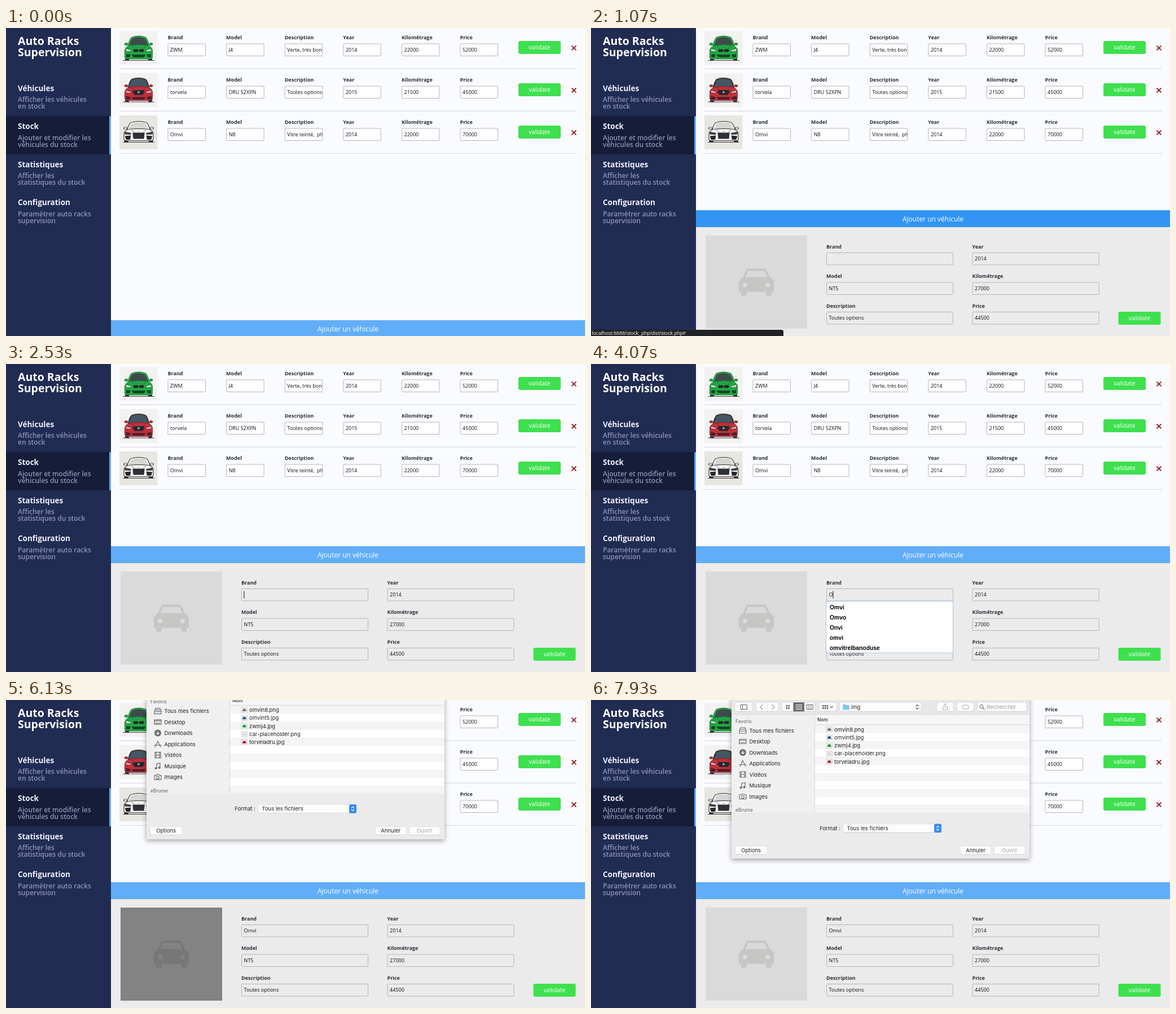
Write an HTML page that moves like this. It is 1026 px wide and 546 px high and loops after 8 s.

```html
<!DOCTYPE html>
<html lang="fr">
<head>
<meta charset="utf-8">
<title>Auto Racks Supervision</title>
<style>
  html, body { margin: 0; width: 100%; height: 100%; overflow: hidden; background: #fafbff; }
  svg { display: block; }
  text { font: 9px "Open Sans", sans-serif; fill: #0e0f13; white-space: pre; }
  .title { font-size: 19.5px; font-weight: 700; fill: #fff; }
  .head { font-size: 13.5px; font-weight: 700; fill: #eff1f8; }
  .sub { font-size: 12px; font-weight: 600; fill: #8b93b4; }
  .label { font-weight: 700; fill: #2c2f38; }
  .btn { font-size: 10.5px; font-weight: 500; fill: #fff; text-anchor: middle; }
  .bar { font-size: 12px; font-weight: 500; fill: #fff; text-anchor: middle; }
  .hint { font: 700 10.3px "Liberation Sans", Arial, sans-serif; fill: #000; }
  .link { font: 9.15px "Liberation Sans", Arial, sans-serif; fill: #e4e5e7; }
  .mac { font: 9.5px Inter, sans-serif; fill: #222; }
  .small { font: 500 8.3px Inter, sans-serif; fill: #757575; }
  .mid { text-anchor: middle; }
</style>
</head>
<body>
<svg id="stage" width="1026" height="546" viewBox="0 0 1026 546"></svg>
<script>
const LOOP = 8000;

const rect = (x, y, w, h, fill, more = '') =>
  `<rect x="${x}" y="${y}" width="${w}" height="${h}" fill="${fill}" ${more}/>`;
const text = (x, y, str, cls = '', more = '') =>
  `<text x="${x}" y="${y}" class="${cls}" ${more}>${str}</text>`;
const path = (d, fill, more = '') => `<path d="${d}" fill="${fill}" ${more}/>`;
const line = (d, color, width = 1) =>
  path(d, 'none', `stroke="${color}" stroke-width="${width}" stroke-linecap="round"`);
const dot = (x, y, r, fill) => `<circle cx="${x}" cy="${y}" r="${r}" fill="${fill}"/>`;
const group = (id, body) => `<g id="${id}">${body}</g>`;

const field = (x, y, w, value, fill, id = '') =>
  rect(x + .5, y + .5, w - 1, 21.5, fill, 'stroke="#b4b5b8" rx="1"') +
  `<svg x="${x}" y="${y}" width="${w}" height="22">` +
  text(4.6, 14, value, '', id && `id="${id}"`) + '</svg>';
const button = (x, y) =>
  rect(x, y, 75, 23, '#3ee04e', 'rx="3"') + text(x + 37.5, y + 15.2, 'validate', 'btn');

function sidebar() {
  const items = [
    ['Véhicules', 'Afficher les véhicules', 'en stock'],
    ['Stock', 'Ajouter et modifier les', 'véhicules du stock'],
    ['Statistiques', 'Afficher les', 'statistiques du stock'],
    ['Configuration', 'Paramétrer auto racks', 'supervision']
  ];
  return rect(0, 0, 186, 546, '#212c53') +
    rect(0, 156.5, 186, 67.5, '#151d39') + rect(183, 156.5, 3, 67.5, '#5eacf8') +
    text(21, 30, 'Auto Racks', 'title') + text(21, 49.5, 'Supervision', 'title') +
    items.map(([head, a, b], i) => {
      const y = 111.5 + i * 67.5;
      return text(21, y, head, 'head') + text(21, y + 19.7, a, 'sub') + text(21, y + 31.7, b, 'sub');
    }).join('');
}

// Front view of a car inside a 67 x 60 thumbnail
function car(y, c) {
  const edge = `stroke="${c.edge}" stroke-width="${c.stroke}" stroke-linejoin="round"`;
  const pair = f => f(-1) + f(1);
  const dome = (top, low, y0, y1) =>
    `M${34 - low} ${y1} Q${36 - low} ${y0 + 5} ${34 - top} ${y0} Q34 ${y0 - 5} ${34 + top} ${y0}` +
    ` Q${32 + low} ${y0 + 5} ${34 + low} ${y1}Z`;
  return `<g transform="translate(201 ${y})">` + rect(0, 0, 67.5, 60, c.back) +
    `<g transform="translate(34 ${c.dy}) scale(${c.wide} ${c.tall}) translate(-34 0)">` +
    pair(s => rect(34 + s * 20.5 - 3.5, 42, 7, 11, '#2b2d33', 'rx="1.5"')) +
    pair(s => `<ellipse cx="${34 + s * 22}" cy="23.500" rx="3" ry="2" fill="${c.body}" ${edge}/>`) +
    path(dome(13, 19, 11.5, 27), c.roof, edge) + path(dome(11.5, 16.5, 13.5, 25), c.glass) +
    path('M17 26 Q34 23 51 26 Q57 28.500 58.5 34 V47 Q58 50 55 50 H13 Q10 50 9.500 47 V34 Q11 28.500 17 26Z', c.body, edge) +
    line('M22 27 L26 32 M46 27 L42 32', c.edge, .7) +
    pair(s => path(`M${34 + s * 22.5} 31.500 L${34 + s * 13} 34 L${34 + s * 13.5} 37 L${34 + s * 23} 36Z`, c.light, edge)) +
    c.grille + '</g>' + line(`M6.500 ${c.ground} H61.500`, '#3c3f45') + '</g>';
}

function cars() {
  const dark = '#25282e';
  const slats = [0, 1, 2, 3, 4, 5].map(i => line(`M${26 + i * 3.2} 35 V45`, '#666', .5)).join('');
  return car(5, {
    back: '#f2f2f1', body: '#21a943', roof: '#27ae49', glass: '#3f4a4c', edge: '#14682c', stroke: .8,
    light: '#cfe4d4', dy: 0, wide: 1, tall: 1, ground: 52.5,
    grille: rect(24.5, 32.5, 9, 5, dark, 'rx="2"') + rect(34.5, 32.5, 9, 5, dark, 'rx="2"') +
      dot(34, 29.5, 1.2, '#426b91') +
      path('M12 41 L20 42 L18 47 H12Z M56 41 L48 42 L50 47 H56Z M22 42 H46 L44 47 H24Z', '#17432a')
  }) + car(80, {
    back: '#f2f2f1', body: '#c42f38', roof: '#36424c', glass: '#465663', edge: '#6a222a', stroke: .8,
    light: '#d9b6b8', dy: -.5, wide: 1, tall: .98, ground: 51,
    grille: path('M25 31 H43 L45 35 L41 40 H27 L23 35Z', dark) + dot(34, 35, 2.2, '#8b9298') +
      path('M11 42 L20 44 L18 48 H12Z M57 42 L48 44 L50 48 H57Z M22 44 H46 L44 48 H24Z', '#3f2029')
  }) + car(155, {
    back: '#e8e6e1', body: '#f8f8f6', roof: '#f8f8f6', glass: '#d5d5d3', edge: '#2c2c2e', stroke: 1,
    light: '#44474b', dy: 3, wide: 1.06, tall: .835, ground: 47.5,
    grille: path('M24 33 H44 L43 46 H25Z', dark) + slats + dot(34, 30, 1.1, '#888') +
      path('M11 40 L21 39 L20 48 H13Z M57 40 L47 39 L48 48 H55Z', dark)
  });
}

function stock() {
  const names = ['Brand', 'Model', 'Description', 'Year', 'Kilométrage', 'Price'];
  const rows = [
    ['ZWM', 'J4', 'Verte, très bon état', '2014', '22000', '52000'],
    ['torvela', 'DRU 52XPN', 'Toutes options', '2015', '21500', '45000'],
    ['Omvi', 'N8', 'Vitre teinté,\u00a0 phares', '2014', '22000', '70000']
  ];
  return rows.map((row, r) => {
    const y = r * 75;
    return row.map((v, i) => {
      const x = 286.5 + i * 103.6;
      return text(x, y + 20, names[i], 'label') + field(x, y + 27.5, 67.5, v, '#fff');
    }).join('') + button(908, y + 23) +
      line(`M1003 ${y + 32} l6.800 6.800 m0 -6.800 l-6.800 6.800`, '#9a2c30', 2) +
      rect(201, y + 71.8, 810.5, 1, '#d3d5da');
  }).join('') + cars();
}

function panel() {
  const left = [['Brand', ''], ['Model', 'NT5'], ['Description', 'Toutes options']];
  const right = [['Year', '2014'], ['Kilométrage', '27000'], ['Price', '44500']];
  const column = (x, list, id) => list.map(([name, value], i) => {
    const y = 398 + i * 52.5;
    return text(x, y - 7.3, name, 'label') + field(x, y, 225, value, '#ebebeb', i ? '' : id);
  }).join('');
  const icon =
    path('M269 442 L274.500 430 Q276 426.500 280 426.500 H306 Q310 426.500 311.500 430 L317 442 Q324 445 324 452 V467.500 H262 V452 Q262 445 269 442Z' +
      'M273.500 441.500 H312.500 L308 431.500 Q307.500 430.500 306 430.500 H280 Q278.500 430.500 278 431.500Z', '#c6c6c5', 'fill-rule="evenodd"') +
    rect(266, 464, 9.5, 10.5, '#c6c6c5', 'rx="2"') + rect(310.5, 464, 9.5, 10.5, '#c6c6c5', 'rx="2"') +
    dot(273, 455.5, 4, '#dadada') + dot(313, 455.5, 4, '#dadada');
  const hints = ['Omvi', 'Omvo', 'Onvi', 'omvi', 'omvitrelbanoduse'];
  return rect(186, 353, 840, 193, '#ebebeb') +
    rect(186, 323, 840, 30, '#61aef8', 'id="bar"') +
    text(606, 342.7, 'Ajouter un véhicule', 'bar') +
    rect(203, 368, 180, 165, '#dadada') + icon +
    rect(203, 368, 180, 165, '#000', 'id="shade"') +
    column(417, left, 'brand') + column(675.5, right, '') + button(934.5, 503) +
    rect(421.5, 402.5, 1, 13, '#111', 'id="caret"') +
    group('hints', rect(416.5, 420.5, 225, 91.5, '#fff', 'stroke="#a9c4ea"') +
      hints.map((h, i) => text(423, 434.7 + i * 18, h, 'hint')).join(''));
}

function dialog() {
  const ink = '#606060';
  const box = (x, y, w, h = 15.5) =>
    rect(x, y + .8, w, h, '#cfcfcf', 'rx="3"') + rect(x, y, w, h, '#fcfcfc', 'rx="3" stroke="#d8d8d8" stroke-width=".6"');
  const arrows = (x, y, color) =>
    line(`M${x - 2} ${y - 1.5} l2 -2.300 l2 2.300 M${x - 2} ${y + 1.5} l2 2.300 l2 -2.300`, color, 1.1);
  const grid = (x, y, n) => Array.from({ length: n * 2 }, (_, i) =>
    rect(x + i % n * 3.8, y + Math.floor(i / n) * 4, 2.6, 2.8, ink)).join('');
  const toolbar = box(255, 4.5, 31) +
    path('M265 8.500 H276.500 V16.500 H265Z M268.500 8.500 V16.500', 'none', `stroke="${ink}"`) +
    box(293, 4.5, 39) + rect(312, 4.5, .7, 15.5, '#d2d2d2') +
    line('M304 8.500 l-4 4 l4 4 M321 8.500 l4 4 l-4 4', '#a2a2a2', 1.2) +
    box(339, 4.5, 58) + rect(358.5, 4.3, 19.5, 16, '#6a6a6a') + grid(345.5, 9, 2) +
    line('M363 8.500 h11 m0 2.700 h-11 m0 2.700 h11 m0 2.700 h-11', '#fff') +
    path('M382.500 8.500 h11 v8 h-11z m3.700 0 v8 m3.700 -8 v8', 'none', `stroke="${ink}"`) +
    box(404, 4.5, 31) + grid(410, 9, 3) + line('M424 11.500 l2.200 2.200 l2.200 -2.200', ink, 1.2) +
    box(441, 4.5, 144) + path('M446.500 8 h4 l1 1.300 h6 v8 h-11z', '#65b5e6') + rect(446.5, 10.2, 11, 7, '#80c8f1', 'rx="1"') +
    text(461, 15.8, 'img', 'mac') + arrows(578, 12.4, '#444') +
    box(613, 4.5, 29) + line('M625.500 11 h-2 v6.500 h8 v-6.500 h-2 M627.500 14 v-7.500 m-2 2 l2 -2 l2 2', '#a8a8a8', .9) +
    box(649, 4.5, 29) + rect(657.5, 9, 12, 7, 'none', 'rx="3.5" stroke="#a8a8a8"') +
    box(685, 4.5, 86.5) + `<circle cx="692" cy="11.500" r="3" fill="none" stroke="${ink}"/>` +
    line('M694.300 14 l2.700 2.800', ink, 1.2) + text(701.5, 15.8, 'Rechercher', 'mac', 'style="fill:#9b9b9b"');

  const icons = [
    'M-4 -5 h8 l2 5 v5 h-12 v-5z M-6 1 h12 M-4 -2 h8',
    'M-6 -4 h12 v8 h-12z M-6 -2 h12 M-4 2 h8',
    '',
    'M-5 5 L0 -5 L5 5 M-6 2 H6',
    'M-5 -5 h10 v10 h-10z M-3 -5 v10 M3 -5 v10 M-3 0 h6',
    'M-2 4 V-4 L4 -5 V3',
    'M-6 -3 h3 l1 -1.500 h4 l1 1.500 h3 v7.500 h-12z M-2.500 1 a2.500 2.500 0 1 0 5 0 a2.500 2.500 0 1 0 -5 0'
  ];
  const places = ['Tous mes fichiers', 'Desktop', 'Downloads', 'Applications', 'Vidéos', 'Musique', 'Images'].map((p, i) => {
    const y = 54 + i * 19.5;
    let art = `<g transform="translate(269 ${y})">${line(icons[i], '#6c6c6c', 1.2)}</g>`;
    if (i === 2) art = dot(269, y, 6, '#6c6c6c') + line(`M269 ${y - 3} v5.500 m-2.500 -2.500 l2.500 2.500 l2.500 -2.500`, '#fff', 1.2);
    if (i === 5) art += dot(265.5, y + 4, 2, '#6c6c6c') + dot(271.5, y + 3, 2, '#6c6c6c');
    return art + text(280.5, y + 3.5, p, 'mac');
  }).join('');

  const files = [['omvin8.png', '#777'], ['omvint5.jpg', '#315c8d'], ['zwmj4.jpg', '#239b43'],
    ['car-placeholder.png', '#d8d8d8'], ['torveladru.jpg', '#a12f3a']];
  const stripes = Array.from({ length: 11 }, (_, i) =>
    rect(397, 44.5 + i * 14.2, 380, Math.min(14.2, 155.5 - i * 14.2), i % 2 ? '#fff' : '#f4f4f5')).join('');
  const list = files.map(([name, color], i) => {
    const y = 52 + i * 14.25;
    return rect(417, y - 4.5, 10.5, 9.5, '#eee', 'stroke="#c9c9c9" stroke-width=".7"') +
      path(`M419 ${y + 2.5} v-2 l1.500 -2.500 h3.500 l1.500 2.500 v2z`, color) +
      text(431, y + 3.5, name, 'mac');
  }).join('');

  return rect(249, -20, 528, 301, '#ececec', 'filter="url(#shadow)"') +
    rect(249, -20, 528, 46, '#e7e7e7') + rect(249, 25.5, 528, .8, '#cbcbcb') + toolbar +
    rect(249, 26.3, 147.5, 174, '#f0f0f0') + rect(396.3, 26.3, .8, 174, '#d2d2d2') +
    rect(397, 26.3, 380, 17.5, '#f6f6f6') + stripes + rect(397, 43.3, 380, .8, '#d4d4d4') +
    text(401, 38, 'Nom', 'small', 'style="fill:#2b2b2b"') + list +
    text(256, 40.5, 'Favoris', 'small') + places + text(256, 198, 'eBrume', 'small') +
    rect(249, 200, 528, 81, '#ebebeb') +
    text(442, 230.5, 'Format :', 'mac', 'style="text-anchor:end"') +
    box(447, 219.7, 174, 15) + rect(608, 219.5, 13, 15.6, '#388bf2', 'rx="3"') + arrows(614.5, 227.3, '#fff') +
    text(453.5, 230.7, 'Tous les fichiers', 'mac') +
    box(255.5, 259, 56.5, 14.5) + text(283.7, 269.9, 'Options', 'mac mid') +
    box(654.5, 259, 54.5, 14.5) + text(681.7, 269.9, 'Annuler', 'mac mid') +
    box(714.5, 259, 54.5, 14.5) + text(741.7, 269.9, 'Ouvrir', 'mac mid', 'style="fill:#a3a3a3"');
}

const $ = id => document.getElementById(id);
$('stage').innerHTML =
  '<defs><filter id="shadow" x="-10%" y="-10%" width="120%" height="125%">' +
  '<feDropShadow dx="0" dy="3" stdDeviation="4" flood-opacity=".36"/></filter></defs>' +
  rect(0, 0, 1026, 546, '#fafbff') + stock() + group('panel', panel()) + sidebar() +
  group('status', path('M0 535 H338 Q341 535 341 538 V546 H0Z', '#212225') +
    text(1.5, 544, 'localhost:8888/stock_php/dist/stock.php#', 'link')) +
  group('dialog', dialog());

// CSS "ease": solve the curve for x, return y
function ease(x) {
  let lo = 0, hi = 1;
  const curve = (u, a, b) => 3 * u * (1 - u) * (1 - u) * a + 3 * u * u * (1 - u) * b + u * u * u;
  for (let i = 0; i < 16; i++) {
    const u = (lo + hi) / 2;
    if (curve(u, .25, .25) < x) lo = u; else hi = u;
  }
  return curve(lo, .1, 1);
}
const ramp = (t, from, span) => ease(Math.min(1, Math.max(0, (t - from) / span)));
const mix = (a, b, k) => a.map((v, i) => Math.round(v + (b[i] - v) * k));
const show = (id, on) => $(id).setAttribute('visibility', on ? 'visible' : 'hidden');

const FOCUS = 2070, TYPE = 3600, PICK = 4600, BLUR = 5150;

function draw(t) {
  const hover = ramp(t, 130, 200) - ramp(t, 1300, 200);
  $('bar').setAttribute('fill', `rgb(${mix([97, 174, 248], [50, 149, 244], hover)})`);
  $('panel').setAttribute('transform', `translate(0 ${195 * (1 - ramp(t, 330, 500))})`);
  show('status', t >= 200 && t < 1530);

  const typed = t < TYPE ? '' : t < PICK ? 'O' : 'Omvi';
  const brand = $('brand');
  if (brand.textContent !== typed) brand.textContent = typed;
  const last = t < TYPE ? FOCUS : t < PICK ? TYPE : PICK;
  show('caret', t >= FOCUS && t < BLUR && (t - last) % 1000 < 500);
  $('caret').setAttribute('x', 421.5 + (typed ? brand.getComputedTextLength() : 0));
  show('hints', t >= TYPE && t < PICK);

  const shade = ramp(t, 4850, 400) - ramp(t, 6560, 400);
  $('shade').setAttribute('opacity', .4 * shade);
  show('dialog', t >= 5950);
  $('dialog').setAttribute('transform', `translate(0 ${-300 * (1 - ramp(t, 5950, 300))})`);
}

let start;
function tick(now) {
  start ??= now;
  draw((now - start) % LOOP);
  requestAnimationFrame(tick);
}
draw(0);
requestAnimationFrame(tick);
</script>
</body>
</html>
```
